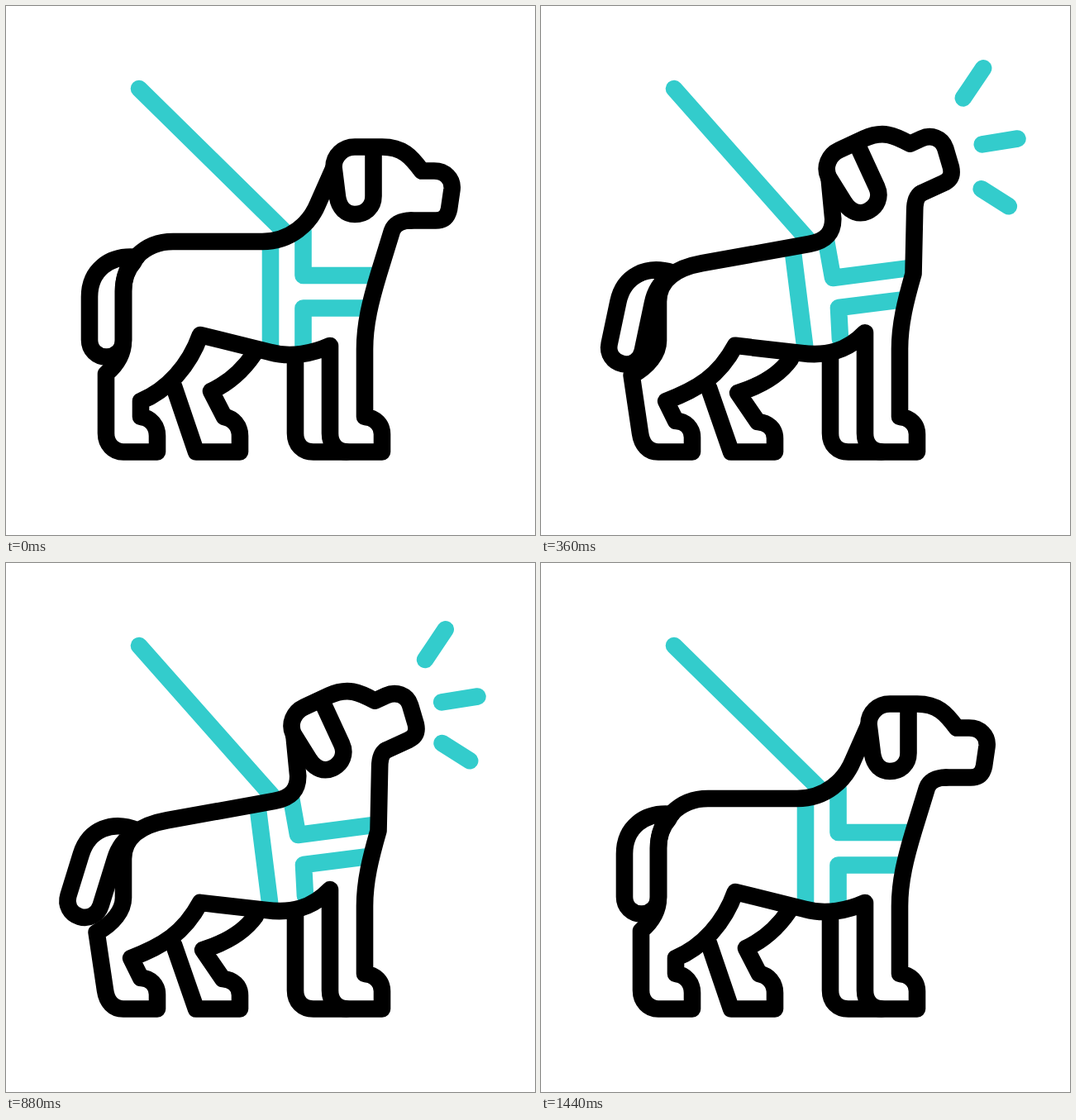
An HTML page for the animation above (2040 ms loop, 640 by 640 pixels).

```html
<!DOCTYPE html>
<html lang="en">
<head>
<meta charset="utf-8">
<title>Barking guide dog</title>
<style>
  html, body { margin: 0; width: 100%; height: 100%; overflow: hidden; background: #fff; }
  svg { display: block; width: 100vw; height: 100vh; }
  path { fill: none; stroke: #000; stroke-width: 20.6; stroke-linecap: round; stroke-linejoin: round; }
  .teal path { stroke: #33cccc; }
</style>
</head>
<body>
<svg viewBox="0 0 640 640">
  <g class="teal">
    <path id="harness"/>
    <path id="bark"/>
  </g>
  <path id="tail" d="M158 304C125 301 101 320 101 352V404C101 416 110 424.500 121.500 424.500C133 424.500 142 416 142 404V345C142 330 147 318 155 309"/>
  <path id="farLegs"/>
  <path id="body"/>
  <path id="head" d="M490 259.500H520C529 259.500 534 255 536 246L539.500 222C541 209 531 199.500 518 199.500H503C490 182 480 170.500 455 170.500H422C408 170.500 396.500 181 396.500 195L401 231C403 244 411 252 422 252C435 252 444.500 243 444.500 230V178"/>
</svg>
<script>
const LOOP = 2040, STEP = 40;
const el = id => document.getElementById(id);
const lerp = (a, b, k) => a + (b - a) * k;
const clamp = x => Math.min(1, Math.max(0, x));
const ease = (t, from, to) => {
  const k = clamp((t - from) / (to - from));
  return k * k * (3 - 2 * k);
};

// Blend two paths that share the same commands.
const blend = (a, b) => {
  const end = b.match(/[\d.]+/g).map(Number);
  return k => {
    let i = 0;
    return a.replace(/[\d.]+/g, n => lerp(+n, end[i++], k).toFixed(2));
  };
};

const shapes = {
  harness: blend(
    'M161 100L338 274M320 290L320 412M359.5 272L359.5 326L443 326M359.5 411L359.5 365.5L435 365.5',
    'M161 100L322 282M305 300L319 410M345 285L353 329L441 317.5M362 403L360 365L435 355.5'),
  farLegs: blend(
    'M203 460L230 539.5L283 539.5L283 520C283 508 275 499 264 497L248 466C272 455 287 440 300 421' +
    'M350 428L350 517C350 531 359 539.5 372 539.5L412 539.5',
    'M203 462L230 539.5L283 539.5L283 523C283 512 275 504 262 503L238 468C264 460 287 448 302 427' +
    'M350 426L350 517C350 531 359 539.5 372 539.5L412 539.5'),
  body: blend(
    'M396 197L377 240C368 262 345 285 310 285L202 285C168 285 142 310 142 345L142 405C142 420 135 433 121 445' +
    'L121 517C121 530 130 539.5 142 539.5L183 539.5L183 520C183 508 175 498 163 497L163 478' +
    'C195 465 222 435 235 398L320 419C345 426 372 420 392 411L392 517C392 531 400 539.5 414 539.5' +
    'L455 539.5L455 518C455 507 447 498 434 497L434 415C434 385 441 357 451 324L467 272C470 264 478 259.5 490 259.5',
    'M348 209L353 258C353 275 345 284 325 288L195 311.5C165 317 142 330 142 358L142 405C142 420 130 436 109.5 447' +
    'L120 517C122 531 130 539.5 142 539.5L183 539.5L183 522C183 511 175 502 163 502L151 478' +
    'C190 463 215 448 235 411L315 420C345 424 370 418 392 395L392 517C392 531 400 539.5 414 539.5' +
    'L455 539.5L455 518C455 507 447 498 434 497L434 415C434 385 441 357 450.5 324L452 247C452 237 454 230 459 226.5')
};

// How far the dog has raised its head, 0 to 1.
const lift = t =>
  ease(t, 0, 320) - 0.22 * ease(t, 320, 600) + 0.22 * ease(t, 600, 920) - ease(t, 920, 1380);

// Tail angle: swing out, wag, swing back.
const wag = t => {
  const first = 240, last = 1240, period = 200;
  const phase = clamp((t - first) / (last - first)) * (last - first) / period;
  const beat = 1 - 0.23 * (1 - Math.cos(phase * 2 * Math.PI));
  return 20.4 * beat * ease(t, 0, first) * (1 - ease(t, last, 1440));
};

const rays = [
  [503, 123, 536, 74],
  [520, 169.5, 578, 160.3],
  [522, 214.5, 567, 243]
];

const barkPath = t => {
  const phase = t < 600 ? t : t - 540;
  const tip = ease(phase, 220, 375), root = ease(phase, 295, 500);
  if (tip - root < 0.01) return '';
  return rays.map(([x, y, u, v]) => {
    const at = k => `${lerp(x, u, k)} ${lerp(y, v, k)}`;
    return `M${at(root)}L${at(tip)}`;
  }).join('');
};

function draw(t) {
  const p = lift(t);
  for (const id in shapes) el(id).setAttribute('d', shapes[id](p));
  el('head').setAttribute('transform', `rotate(${-25 * p} 400 312)`);
  el('tail').setAttribute('transform', `translate(0 ${17 * p}) rotate(${wag(t)} 150 310)`);
  el('bark').setAttribute('d', barkPath(t));
}

const start = performance.now();
function tick() {
  const t = (performance.now() - start) % LOOP;
  draw(Math.floor(t / STEP) * STEP);
  requestAnimationFrame(tick);
}
tick();
</script>
</body>
</html>
```
